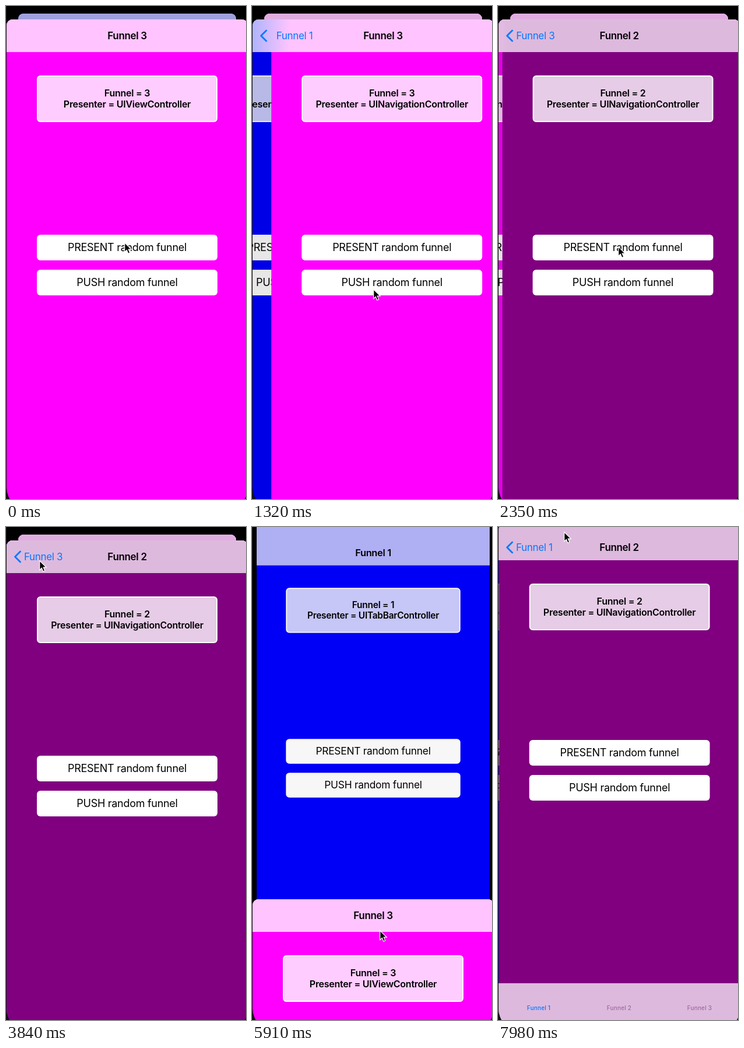
An HTML page that plays this animation: 412x845 px, repeating every 8000 ms.

```html
<!DOCTYPE html>
<html lang="en">
<head>
<meta charset="utf-8">
<title>Funnels</title>
<style>
  html, body { margin: 0; width: 100%; height: 100%; overflow: hidden; background: #111; }
  body { position: relative; font-family: Inter, "Open Sans", sans-serif; color: #000; }
  body div, body svg { position: absolute; box-sizing: border-box; }
  #phone { left: 1px; top: -31px; width: 414px; height: 896px; overflow: hidden; border-radius: 40px; background: #000; }
  .stack { left: 0; top: 0; width: 414px; height: 842px; overflow: hidden; border-radius: 10px 10px 0 0; transform-origin: 50% 0; }
  .page, .dim { inset: 0; }
  .dim { background: #000; opacity: 0; }
  .card, .button { left: 52px; width: 310px; border-radius: 6px; text-align: center; white-space: nowrap; }
  .card { height: 80px; padding-top: 19px; border: 2px solid #fff; background: rgba(255, 255, 255, .8); font: 600 16px/19px Inter, sans-serif; letter-spacing: -.016em; }
  .button { height: 44px; background: #fff; font-size: 18px; line-height: 44px; letter-spacing: -.016em; }
  .bar { left: 0; top: 0; width: 100%; height: 56px; overflow: hidden; }
  .tint { left: 0; top: 0; width: 474px; height: 100%; }
  .title { left: 0; width: 414px; text-align: center; font-weight: 600; }
  .title, .back { font-size: 17px; line-height: 44px; height: 44px; bottom: 6px; letter-spacing: -.02em; white-space: nowrap; }
  .back { left: 30px; color: #007aff; }
  .chevron { left: 12px; bottom: 17px; width: 14px; height: 22px; fill: none; stroke: #007aff; stroke-width: 2.8; stroke-linecap: round; stroke-linejoin: round; }
  .root { height: 896px; }
  .root .bar { height: 88px; }
  .root .title, .root .back { bottom: 0; }
  .root .chevron { bottom: 11px; }
  .root .tabs { top: auto; bottom: 0; height: 83px; }
  .tab { top: 34px; width: 138px; text-align: center; font-size: 10px; line-height: 16px; font-weight: 500; letter-spacing: .02em; }
  #cursor { left: 0; top: 0; width: 16px; height: 23px; overflow: visible; }
</style>
</head>
<body>
<div id="phone"></div>
<svg id="cursor" viewBox="0 0 16 23"><path d="M.7 .8V16.6L4.3 13.2L6.8 19.2L9.7 18L7.2 12.1H12.1Z" fill="#000" stroke="#fff" stroke-width="1.2"/></svg>
<script>
const LOOP = 8000, STEP = 147.8, WIDTH = 414, TRAVEL = 842;
const phone = document.getElementById('phone');
const cursor = document.getElementById('cursor');
const THEMES = {
  1: { page: '#00f', bar: '#b5b5fc', tab: '#6c6cd0' },
  2: { page: '#800080', bar: '#deb9de', tab: '#9b6a9b' },
  3: { page: '#f0f', bar: '#ffc4ff', tab: '#b060b0' }
};

function add(parent, cls, text = '') {
  const el = document.createElement('div');
  el.className = cls;
  el.textContent = text;
  parent.append(el);
  return el;
}

function addTint(bar, n) {
  const el = add(bar, 'tint');
  el.style.background = `linear-gradient(90deg, transparent, ${THEMES[n].bar} 60px)`;
  return el;
}

function buildPage(stack, n, presenter, height, barHeight) {
  const el = add(stack, 'page');
  el.style.background = THEMES[n].page;
  const card = add(el, 'card');
  card.style.top = barHeight + 40 + 'px';
  card.append(`Funnel = ${n}`, document.createElement('br'), `Presenter = ${presenter}`);
  ['PRESENT', 'PUSH'].forEach((verb, i) => {
    add(el, 'button', verb + ' random funnel').style.top = height / 2 - 52 + 60 * i + 'px';
  });
  return { n, el, dim: add(el, 'dim') };
}

// A navigation stack: pages as [number, presenter, push time].
function buildStack(list, root) {
  const el = add(phone, root ? 'stack root' : 'stack');
  const pages = list.map(([n, presenter, start]) => ({
    start, ...buildPage(el, n, presenter, root ? 896 : 842, root ? 88 : 56)
  }));
  const bar = add(el, 'bar');
  bar.style.background = THEMES[pages[0].n].bar;
  pages.forEach(p => p.tint = addTint(bar, p.n));
  pages.forEach((p, i) => {
    p.title = add(bar, 'title', `Funnel ${p.n}`);
    if (i) p.back = add(bar, 'back', `Funnel ${pages[i - 1].n}`);
  });
  let chevron, tabs = [];
  if (pages[1]) {
    bar.insertAdjacentHTML('beforeend', '<svg class="chevron" viewBox="0 0 14 22"><path d="M11.5 2L2.5 11L11.5 20"/></svg>');
    chevron = bar.lastChild;
  }
  if (root) {
    const tabBar = add(el, 'bar tabs');
    tabBar.style.background = THEMES[pages[0].n].bar;
    pages.forEach(p => p.tabTint = addTint(tabBar, p.n));
    tabs = [1, 2, 3].map((n, i) => {
      const tab = add(tabBar, 'tab', `Funnel ${n}`);
      tab.style.left = 138 * i + 'px';
      return tab;
    });
    tabs[0].style.color = '#007aff';
  }
  return { el, pages, chevron, tabs, dim: add(el, 'dim') };
}

const root = buildStack([[1, 'UITabBarController', -1e4], [2, 'UINavigationController', 7500]], true);
const lower = buildStack([[3, 'UIViewController', -1e4]]);
const upper = buildStack([[1, 'UIViewController', -1e4], [3, 'UINavigationController', 1100], [2, 'UINavigationController', 2030]]);

// Distance left (1 to 0) of a critically damped spring.
function spring(ms) {
  const w = Math.max(0, ms) * .01826;
  return Math.exp(-w) * (1 + w);
}

// Linear path through rows of [time, value, ...].
function path(rows, t) {
  const k = rows.findIndex(row => row[0] > t);
  if (k < 0) return rows[rows.length - 1].slice(1);
  if (k === 0) return rows[0].slice(1);
  const a = rows[k - 1], b = rows[k], f = (t - a[0]) / (b[0] - a[0]);
  return a.slice(1).map((v, i) => v + (b[i + 1] - v) * f);
}

const UPPER_DRAG = [[4040, 0], [4138, 40], [4286, 320], [4434, 740], [4582, 850], [4730, 853], [5000, 842]];
const LOWER_DRAG = [[5469, 0], [5617, 120], [5765, 400], [5912, 615], [6060, 690], [6207, 765], [6355, 842], [6503, 850], [6800, 842]];
const POINTER = [
  [590, 203, 405], [1030, 208, 485], [2060, 208, 485], [2365, 206, 412], [2940, -20, 300],
  [3700, -20, 57], [3840, 57, 57], [4040, 57, 57], [4138, 57, 97], [4286, 62, 377], [4434, 66, 797],
  [4582, 70, 900], [5173, 230, 870], [5321, 222, 300], [5469, 219, 76], [5617, 219, 196],
  [5765, 219, 476], [5912, 219, 691], [6060, 219, 766], [6207, 217, 760], [7095, 179, 448],
  [7686, 179, 448], [7981, 113, 8]
];

const slide = (el, x) => { el.style.transform = `translateX(${x}px)`; };
const recede = p => Math.sign(p) * Math.abs(p) ** .8;

function place(stack, top, scale, shade) {
  stack.el.style.transform = `translateY(${top}px) scale(${scale})`;
  stack.dim.style.opacity = Math.max(0, shade) * .12;
}

function drawStack({ pages, chevron, tabs }, t) {
  const left = pages.map(p => spring(t - p.start));
  const shown = left.map(r => Math.min(1, 1.1 * (1 - r)));
  const barLeft = left.map(r => Math.max(0, r - .015));
  pages.forEach((p, i) => {
    const covered = i + 1 < pages.length ? 1 - left[i + 1] : 0;
    const fade = shown[i] * Math.max(0, 1 - 2 * covered);
    slide(p.el, WIDTH * left[i] - 124 * covered);
    p.dim.style.opacity = covered * .1;
    [p.tint, p.tabTint].forEach(tint => tint && slide(tint, 828 * left[i] - 60));
    slide(p.title, 270 * barLeft[i] - 136 * covered);
    p.title.style.opacity = fade;
    if (p.back) {
      slide(p.back, 170 * barLeft[i] - 60 * covered);
      p.back.style.opacity = fade;
    }
  });
  if (chevron) chevron.style.opacity = shown[1];
  const top = pages[left[1] < .5 ? 1 : 0];
  tabs.slice(1).forEach(tab => { tab.style.color = THEMES[top.n].tab; });
}

function draw(now) {
  const t = Math.floor((now % LOOP + 16) / STEP) * STEP;
  const upperY = t < 3000 ? TRAVEL * spring(t - 110) : path(UPPER_DRAG, t)[0];
  const lowerY = path(LOWER_DRAG, t)[0];
  const up = 1 - upperY / TRAVEL, low = 1 - lowerY / TRAVEL;
  const rootScale = 1 - .0966 * recede(low);
  const rootTop = 448 - 448 * rootScale - 5 * Math.sin(Math.PI * low) + .7 * low;

  place(root, rootTop + 10 * up, rootScale - .08 * up, low);
  place(lower, 54 + lowerY - 10 * up, 1 - .0966 * recede(up), up);
  place(upper, 54 + upperY, 1, 0);
  [root, lower, upper].forEach(stack => drawStack(stack, t));

  const [x, y] = path(POINTER, t);
  cursor.style.transform = `translate(${x}px, ${y}px)`;
}

const begin = performance.now();
function tick() {
  draw(performance.now() - begin);
  requestAnimationFrame(tick);
}
tick();
</script>
</body>
</html>
```
